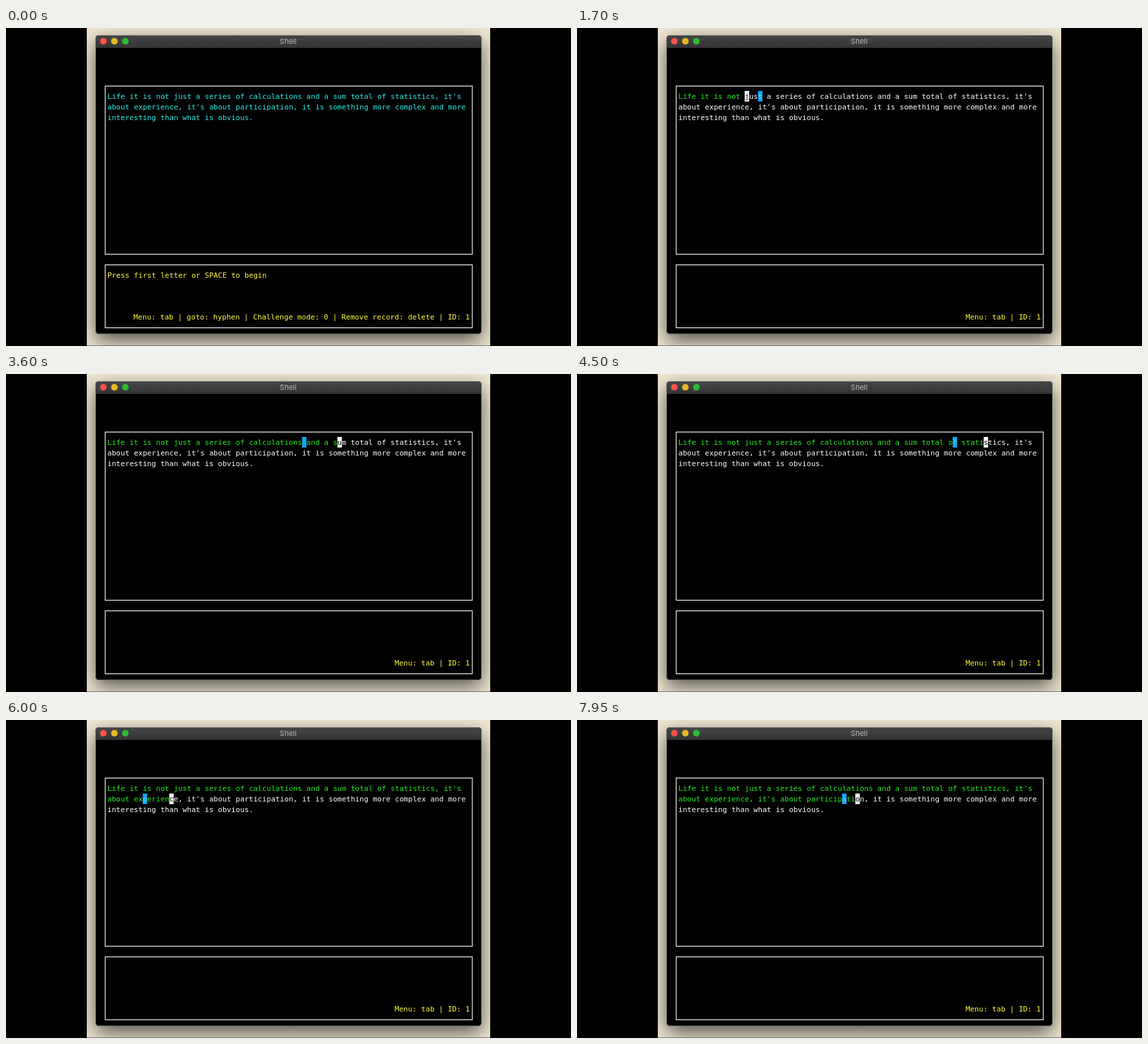
Animation, 853 px wide and 480 px high, one loop 8000 ms. Source, as an HTML page with a canvas:

```html
<!DOCTYPE html>
<html lang="en">
<head>
<meta charset="utf-8">
<title>Typing test</title>
<style>
  html, body { margin: 0; width: 100%; height: 100%; overflow: hidden; background: #000; }
  canvas { display: block; }
</style>
</head>
<body>
<canvas id="stage" width="853" height="480"></canvas>
<script>
const ctx = document.getElementById('stage').getContext('2d');
const LOOP = 8000, START = 850;
const CELL = 6.68, LINE = 16, LEFT = 153, TOP = 95;
const CYAN = '#2bf0e6', GREEN = '#22ee22', YELLOW = '#ffff3c', WHITE = '#fff';
const GHOST = '#12a4f4', GHOST_TEXT = '#55d8e4';

const lines = [
  "Life it is not just a series of calculations and a sum total of statistics, it's ",
  "about experience, it's about participation, it is something more complex and more ",
  'interesting than what is obvious.'
];

// Positions over time: [ms, character index]
const typist = [[START, 1], [1700, 15], [2750, 36], [4500, 69], [6000, 95], [7000, 106], [7950, 121]];
const rival = [[START, 1], [1700, 18], [2750, 27], [4500, 62], [6000, 89], [7000, 108], [7950, 118]];

function indexAt(track, t) {
  const next = track.findIndex(point => point[0] > t);
  if (next < 0) return track[track.length - 1][1];
  const [t0, a] = track[next - 1], [t1, b] = track[next];
  return Math.round(a + (b - a) * (t - t0) / (t1 - t0));
}

function drawChars(text, x, baseline, color) {
  ctx.fillStyle = color;
  [...text].forEach((char, i) => ctx.fillText(char, x + i * CELL, baseline));
}

function drawRight(text, baseline) {
  drawChars(text, 700.3 - text.length * CELL, baseline, YELLOW);
}

function drawWindow() {
  ctx.fillStyle = '#000';
  ctx.fillRect(0, 0, 853, 480);

  ctx.save();
  ctx.beginPath();
  ctx.rect(122, 0, 609, 479.5);
  ctx.clip();
  ctx.fillStyle = '#f1e8d3';
  ctx.fillRect(122, 0, 609, 480);
  ctx.shadowColor = 'rgba(0,0,0,.65)';
  ctx.shadowBlur = 30;
  ctx.shadowOffsetY = 10;
  ctx.fillStyle = '#000';
  ctx.beginPath();
  ctx.roundRect(135, 11, 583, 451, 5);
  ctx.fill();
  ctx.restore();

  const bar = ctx.createLinearGradient(0, 11, 0, 30);
  bar.addColorStop(0, '#464646');
  bar.addColorStop(1, '#343434');
  ctx.fillStyle = bar;
  ctx.beginPath();
  ctx.roundRect(135, 11, 583, 19, [5, 5, 0, 0]);
  ctx.fill();

  ctx.lineWidth = 1;
  ctx.strokeStyle = '#555';
  ctx.beginPath();
  ctx.roundRect(135.5, 11.5, 582, 450, 5);
  ctx.stroke();

  ['#ff5148', '#e1b824', '#2cbd35'].forEach((color, i) => {
    ctx.fillStyle = color;
    ctx.beginPath();
    ctx.arc(147 + i * 16.6, 20, 5, 0, Math.PI * 2);
    ctx.fill();
  });

  ctx.font = '11px Inter, sans-serif';
  ctx.textAlign = 'center';
  ctx.fillStyle = '#b9b9b9';
  ctx.fillText('Shell', 426, 24);
  ctx.textAlign = 'left';

  ctx.strokeStyle = '#f4f4f4';
  ctx.lineWidth = 1.2;
  ctx.strokeRect(149.8, 87.6, 554.2, 253.9);
  ctx.strokeRect(149.8, 357.5, 554.2, 95);
}

function drawPassage(colorOf, cellOf) {
  let index = 0;
  lines.forEach((line, row) => [...line].forEach((char, col) => {
    const x = LEFT + col * CELL, y = TOP + row * LINE, fill = cellOf(index);
    if (fill) {
      ctx.fillStyle = fill;
      ctx.fillRect(x, y, CELL, LINE);
    }
    drawChars(char, x, y + 12, colorOf(index));
    index++;
  }));
}

function draw(t) {
  drawWindow();
  ctx.font = '11.1px "DejaVu Sans Mono", monospace';
  if (t < START) {
    drawPassage(() => CYAN, () => null);
    drawChars('Press first letter or SPACE to begin', LEFT, 376.5, YELLOW);
    drawRight('Menu: tab | goto: hyphen | Challenge mode: 0 | Remove record: delete | ID: 1', 440);
    return;
  }
  const cursor = indexAt(typist, t), ghost = indexAt(rival, t);
  drawPassage(
    i => i === cursor ? '#000' : i === ghost ? GHOST_TEXT : i < cursor ? GREEN : WHITE,
    i => i === cursor ? WHITE : i === ghost ? GHOST : null
  );
  drawRight('Menu: tab | ID: 1', 440);
}

const begin = performance.now();
function tick() {
  const elapsed = (performance.now() - begin) % LOOP;
  draw(Math.floor(elapsed / 50) * 50);
  requestAnimationFrame(tick);
}
tick();
</script>
</body>
</html>
```
